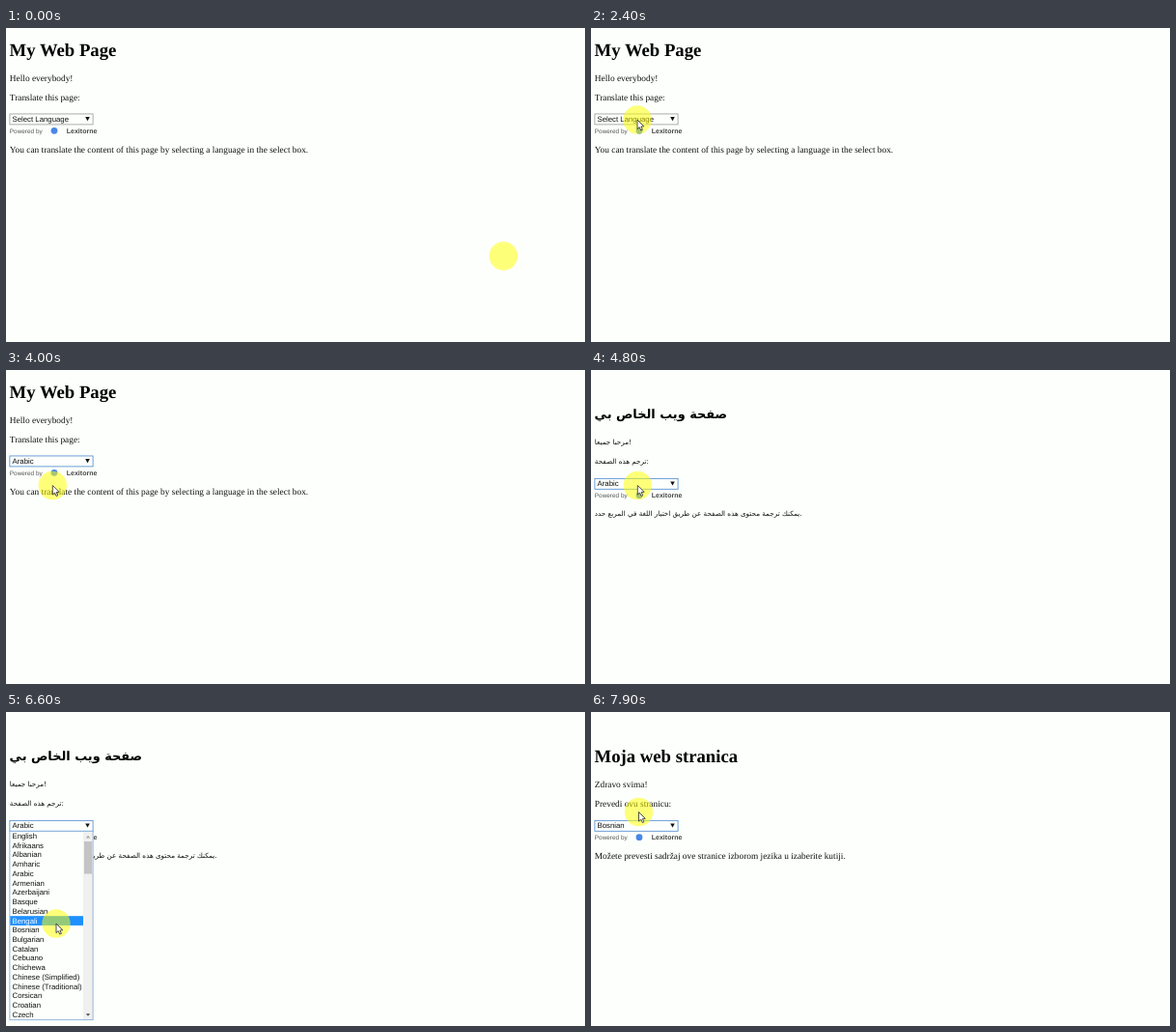
An HTML page with a canvas for the animation above (8000 ms loop, 600 by 325 pixels).

```html
<!DOCTYPE html>
<html lang="en">
<head>
<meta charset="utf-8">
<title>Page translation demo</title>
<style>
  html, body { margin: 0; width: 100%; height: 100%; overflow: hidden; background: #fcfffc; }
  canvas { display: block; width: 600px; height: 325px; }
</style>
</head>
<body>
<canvas id="stage"></canvas>
<script>
const LOOP = 8000, STEP = 100, W = 600, H = 325;
const SERIF = '"Liberation Serif", serif';
const SANS = '"Liberation Sans", sans-serif';
const ARABIC = '"DejaVu Sans", sans-serif';
const PAPER = '#fcfffc';
const BOX = { x: 3.9, y: 88.95, w: 86.2, h: 10.95 };
const ROW = 9.73, LIST_TOP = 100.2, VISIBLE = 20, TRANSLATED_SHIFT = 23.4;

const canvas = document.getElementById('stage');
const ctx = canvas.getContext('2d');
const ratio = window.devicePixelRatio || 1;
canvas.width = W * ratio;
canvas.height = H * ratio;
// Unhinted glyphs keep the proportions of a scaled-down page.
ctx.textRendering = 'geometricPrecision';

const languages = ['Select Language', 'English', 'Afrikaans', 'Albanian', 'Amharic', 'Arabic',
  'Armenian', 'Azerbaijani', 'Basque', 'Belarusian', 'Bengali', 'Bosnian', 'Bulgarian',
  'Catalan', 'Cebuano', 'Chichewa', 'Chinese (Simplified)', 'Chinese (Traditional)',
  'Corsican', 'Croatian', 'Czech'];

const english = {
  font: SERIF, title: 18.7, body: 9.35, titleY: 28.6, rise: 0,
  lines: ['My Web Page', 'Hello everybody!', 'Translate this page:',
    'You can translate the content of this page by selecting a language in the select box.']
};
const arabic = {
  font: ARABIC, title: 12.9, body: 7.2, titleY: 26.4, rise: 1,
  lines: ['صفحة ويب الخاص بي', 'مرحبا جميعا!', 'ترجم هذه الصفحة:',
    'يمكنك ترجمة محتوى هذه الصفحة عن طريق اختيار اللغة في المربع حدد.']
};
const bosnian = {
  ...english,
  lines: ['Moja web stranica', 'Zdravo svima!', 'Prevedi ovu stranicu:',
    'Možete prevesti sadržaj ove stranice izborom jezika u izaberite kutiji.']
};

// Each entry holds from its start time until the next one.
const pages = [[0, english, 0], [4800, arabic, TRANSLATED_SHIFT],
  [7100, english, TRANSLATED_SHIFT], [7300, bosnian, TRANSLATED_SHIFT]];
const values = [[0, 'Select Language'], [3700, 'Arabic'], [7000, 'Bosnian']];
const menus = [{ from: 2800, to: 3700, first: 0, picked: 0 },
  { from: 6000, to: 7000, first: 1, picked: 4 }];
const clicks = [2700, 3600, 5700, 6900];
const path = [[0, 515.5, 236], [900, 515.5, 236], [1600, 60, 114], [1900, 48, 95],
  [2700, 48, 95], [3000, 48.3, 128.5], [3300, 48.3, 153], [3600, 48.3, 153],
  [4000, 48.3, 119.5], [6000, 48.3, 119.5], [6600, 52, 219], [6800, 52, 229],
  [7500, 52, 229], [7900, 49.5, 103.5], [LOOP, 49.5, 103.5]];

function active(track, t) {
  return track.filter(entry => entry[0] <= t).pop();
}

function pointerAt(t) {
  const i = Math.max(1, path.findIndex(p => p[0] > t));
  const [t0, x0, y0] = path[i - 1], [t1, x1, y1] = path[i];
  const u = (t - t0) / (t1 - t0), k = u * u * (3 - 2 * u);
  return { x: x0 + (x1 - x0) * k, y: y0 + (y1 - y0) * k };
}

function text(str, x, y, font, color) {
  ctx.font = font;
  ctx.fillStyle = color;
  ctx.fillText(str, x, y);
}

function rect(x, y, w, h, color) {
  ctx.fillStyle = color;
  ctx.fillRect(x, y, w, h);
}

function frame(x, y, w, h, color) {
  ctx.strokeStyle = color;
  ctx.lineWidth = 0.8;
  ctx.strokeRect(x, y, w, h);
}

function disc(x, y, r, color) {
  ctx.fillStyle = color;
  ctx.beginPath();
  ctx.arc(x, y, r, 0, Math.PI * 2);
  ctx.fill();
}

function triangle(x, y, half, h, color) {
  ctx.fillStyle = color;
  ctx.beginPath();
  ctx.moveTo(x - half, y);
  ctx.lineTo(x + half, y);
  ctx.lineTo(x, y + h);
  ctx.fill();
}

function drawPage(page) {
  const [title, ...body] = page.lines;
  text(title, 3.6, page.titleY, `bold ${page.title}px ${page.font}`, '#000');
  [54.7, 74.8, 128.6].forEach((y, i) =>
    text(body[i], 3.8, y - page.rise, `${page.body}px ${page.font}`, '#111'));
}

function drawSelect(value, focused) {
  rect(BOX.x, BOX.y, BOX.w, BOX.h, PAPER);
  frame(BOX.x, BOX.y, BOX.w, BOX.h, focused ? '#4a88d0' : '#999');
  text(value, 6.5, 97, `7.8px ${SANS}`, '#111');
  triangle(84.5, 92, 2.3, 4.2, '#111');
  text('Powered by', 3.8, 108.8, `6.43px ${SANS}`, '#555');
  disc(50, 106.3, 3.4, '#4a86e8');
  text('Lexitorne', 62.8, 108.8, `bold 7px ${SANS}`, '#444');
}

function drawMenu(menu, shift, y) {
  const top = BOX.y + BOX.h, height = 195.4;
  const hovered = Math.floor((y - shift - LIST_TOP) / ROW);
  const selected = hovered < 0 ? menu.picked : hovered;
  rect(BOX.x, top, BOX.w, height, PAPER);
  languages.slice(menu.first, menu.first + VISIBLE).forEach((name, i) => {
    const rowTop = LIST_TOP + i * ROW;
    if (i === selected) rect(4.2, rowTop, 75.8, ROW, '#1e90ff');
    text(name, 6.5, rowTop + 7.4, `7.8px ${SANS}`, i === selected ? '#fff' : '#111');
  });
  rect(80, top, 10, height, '#f0f0f0');
  rect(81, 110 + menu.first * 0.6, 8, 33.5, '#c4c4c4');
  triangle(85, 107, 2.2, -2.6, '#a3a3a3');
  triangle(85, 288.8, 2.2, 2.6, '#505050');
  frame(BOX.x, top, BOX.w, height, '#78a5d8');
}

function drawArrow(x, y) {
  ctx.beginPath();
  [[0, 0], [0, 9.6], [2.2, 7.6], [3.8, 11], [5.4, 10.3], [3.9, 7], [6.8, 6.8]]
    .forEach(([dx, dy]) => ctx.lineTo(x + dx, y + dy));
  ctx.closePath();
  ctx.fillStyle = '#fff';
  ctx.fill();
  ctx.strokeStyle = '#222';
  ctx.lineWidth = 0.8;
  ctx.stroke();
}

function drawPointer(t, { x, y }) {
  const pressed = clicks.some(c => t >= c && t < c + 200);
  disc(x, y, pressed ? 12 : 14.7, 'rgba(255, 255, 0, 0.52)');
  if (pressed) {
    ctx.strokeStyle = '#e01a10';
    ctx.lineWidth = 2;
    ctx.beginPath();
    ctx.arc(x, y, 12, 0, Math.PI * 2);
    ctx.stroke();
  }
  if (t >= 1800) drawArrow(x, y);
}

function draw(t) {
  const [, page, shift] = active(pages, t);
  const [, value] = active(values, t);
  const menu = menus.find(m => t >= m.from && t < m.to);
  const pointer = pointerAt(t);

  ctx.setTransform(ratio, 0, 0, ratio, 0, 0);
  rect(0, 0, W, H, PAPER);
  ctx.save();
  ctx.translate(0, shift);
  drawPage(page);
  drawSelect(value, t >= 2700);
  if (menu) drawMenu(menu, shift, pointer.y);
  ctx.restore();
  drawPointer(t, pointer);
}

function tick() {
  const t = performance.now() % LOOP;
  draw(Math.floor(t / STEP) * STEP);
  requestAnimationFrame(tick);
}
tick();
</script>
</body>
</html>
```
